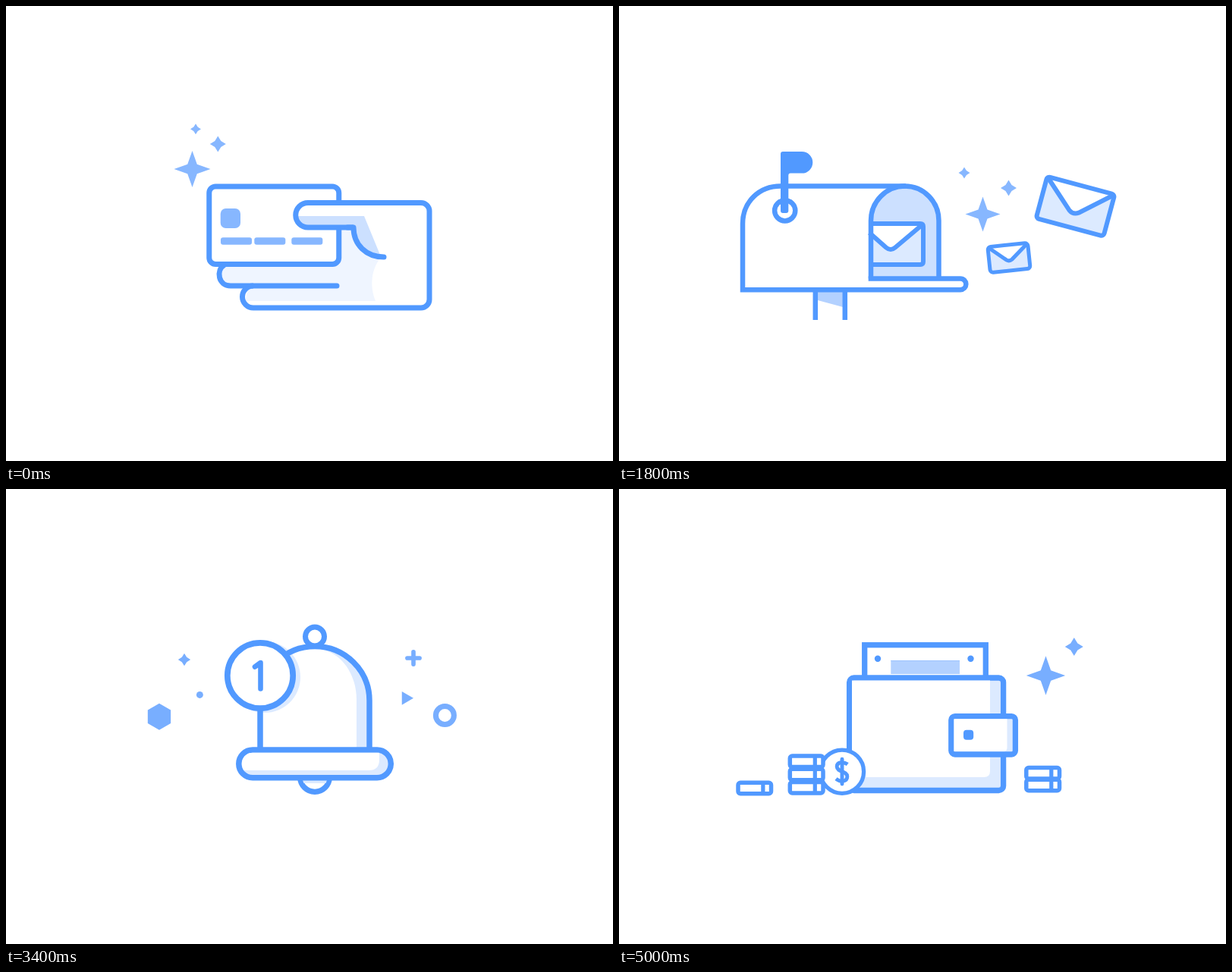
Write an HTML page that moves like this. It is 800 px wide and 600 px high and loops after 5.8 s.

```html
<!DOCTYPE html>
<html lang="en">
<head>
<meta charset="utf-8">
<title>Line icons</title>
<style>
html, body { margin: 0; width: 100%; height: 100%; overflow: hidden; background: #fff; }
svg { display: block; width: 800px; height: 600px; }
</style>
</head>
<body>
<svg id="stage" viewBox="0 0 800 600"></svg>
<script>
const BLUE = '#5199ff', MID = '#78aeff', SOFT = '#87b7ff', SHADE = '#b3d1ff',
      PALE = '#cce0ff', LIGHT = '#dceaff', FAINT = '#eff5ff', WHITE = '#fff';

const area = (d, color) => `<path d="${d}" fill="${color}"/>`;
const line = (d, w = 7, fill = 'none', color = BLUE, cap = 'butt') =>
  `<path d="${d}" fill="${fill}" stroke="${color}" stroke-width="${w}" stroke-linecap="${cap}"/>`;
const round = (d, w, color = BLUE) => line(d, w, 'none', color, 'round');
const rect = (x, y, w, h, r, fill, sw = 0) =>
  `<rect x="${x}" y="${y}" width="${w}" height="${h}" rx="${r}" fill="${fill}"` +
  (sw ? ` stroke="${BLUE}" stroke-width="${sw}"/>` : '/>');
const dot = (x, y, r, color = MID) => `<circle cx="${x}" cy="${y}" r="${r}" fill="${color}"/>`;
const ring = (x, y, r, w, fill = WHITE, color = BLUE) =>
  `<circle cx="${x}" cy="${y}" r="${r}" fill="${fill}" stroke="${color}" stroke-width="${w}"/>`;
const place = (x, y, s, body, turn = 0) =>
  `<g transform="translate(${x} ${y}) rotate(${turn}) scale(${s})">${body}</g>`;

function polygon(x, y, radii, n, color) {
  const points = Array.from({ length: n }, (_, i) => {
    const a = i * 2 * Math.PI / n - Math.PI / 2, r = radii[i % radii.length];
    return `${(x + r * Math.cos(a)).toFixed(1)},${(y + r * Math.sin(a)).toFixed(1)}`;
  });
  return `<polygon points="${points.join(' ')}" fill="${color}"/>`;
}
const star = (x, y, r, color = MID) =>
  polygon(x, y, [r, r * (r > 15 ? .37 : .54)], 8, color);
const plus = (x, y, r, w, color = MID) =>
  round(`M${x - r},${y}h${2 * r}M${x},${y - r}v${2 * r}`, w, color);

const confettiLeft = (x, y, s) => place(x, y, s,
  star(0, 0, 7.5) + dot(18.7, 42.6, 4.1) + polygon(-30.3, 69, [16], 6, MID));
const confettiRight = (x, y, s) => place(x, y, s,
  plus(0, 0, 7.4, 5.2) + area('M-14,40.3l14,8.2l-14,8.2z', MID) +
  ring(38, 69.3, 11, 6.5, WHITE, MID));

const dollar = (x, y, s) => place(x, y, s,
  round('M0,-35.2V34.8', 10.5) +
  line('M15.5,-20.5C5,-28 -14.5,-28 -14.5,-14C-14.5,1.5 14.5,-2 14.5,13.5C14.5,29 -5,30 -17,20', 10.5));

function coins(x, bottom, n, w = 43.5, h = 14.5, step = 15.7, sw = 5.5) {
  let out = '';
  for (let i = 0; i < n; i++) {
    const y = bottom - h - i * step;
    out += rect(x, y, w, h, 3, WHITE, sw) + line(`M${x + w * .755},${y}v${h}`, sw * .95);
  }
  return out;
}

const envelope = (x, y, turn, w, h, sw, dip) => {
  const a = w / 2, b = h / 2, flap = `M${-a + 1},${-b + 1}L${-a * .14},${dip}q${a * .14},${a * .1} ${a * .28},0L${a - 1},${-b + 1}`;
  return place(x, y, 1, rect(-a, -b, w, h, 4, LIGHT) + area(flap + 'z', WHITE) +
    line(flap, sw) + rect(-a, -b, w, h, 4, 'none', sw), turn);
};

const wave = (n, half, rise) =>
  `c${half / 2},0 ${half / 2},${-rise} ${half},${-rise}s${half / 2},${rise} ${half},${rise}`.repeat(n);

function cardInHand() {
  const thumb = 'M458,292H398a16.25,16.25 0 0 1 0,-32.5';
  return star(245.5, 215, 24, SOFT) + star(279.3, 182, 10.5, SOFT) + star(250, 162.3, 7, SOFT) +
    area('M290,341H440V292H458C459,316 476,331 494,332C480,348 480,372 487,389H316C316,378 320,372 326,369H296C277,369 276,345 290,341z', FAINT) +
    round('M288,341C276,349 280,369 296,369H436', 7) +
    rect(267.75, 238, 171, 102.5, 8.5, WHITE, 7) +
    rect(282.7, 267, 26.3, 26, 7, SOFT) +
    [283, 327.3, 376.3].map(x => rect(x, 305.2, 41, 9.6, 3, SOFT)).join('') +
    area(thumb + 'H472V277L458,292z', WHITE) +
    area('M384,277H472L493,328C474,325 462,310 459,292H398C390,292 384,284 384,277z', PALE) +
    line(thumb + 'H547a11,11 0 0 1 11,11V387a11,11 0 0 1 -11,11H326a14.5,14.5 0 0 1 0,-29') +
    `<g stroke-linejoin="round">${round('M450,292H458C458,315 475,331 498,331', 7)}</g>`;
}

function paintedScreen() {
  const paint = 'M456,209V274.5a15.5,15.5 0 0 1 -31,0V258a8.25,8.25 0 0 0 -16.5,0V317a15.5,15.5 0 0 1 -31,0';
  let teeth = '';
  for (let i = 0; i < 10; i++) teeth += `M${345 + 5.35 * i},${247 + 5.35 * i}l-12,12`;
  return confettiLeft(227.7, 254.5, 1) + confettiRight(573, 252.5, 1) +
    area('M375,379H442V395L375,387.5z', '#a8cbff') +
    line('M372,376V396C372,405 366,412 357,412V424.3H459.7V412C451,412 444.7,405 444.7,396V376') +
    rect(283, 184, 250.5, 192, 11, 'none', 7) +
    area(paint + 'L310,290V209z', PALE) + line(paint) +
    rect(310.5, 209, 195.5, 139.3, 0, 'none', 7) +
    line('M272,317C279,335 275,349 266,358L234.3,388a12.5,12.5 0 0 0 17.7,17.7L286,374C296,364 313,362 327,371z', 7, WHITE) +
    dot(244.8, 395.6, 5.6, BLUE) +
    line('M289,293L348,352L327.5,371.5L269.5,314z', 6.5, LIGHT) +
    line('M344,238.5L403,297L348,352L289,293z', 6.5, WHITE) +
    round(teeth, 4.6) + round('M285,303L302,320M308,325.5L311.5,329', 5);
}

function mailbox() {
  const arch = 'M332,359.5V283a44.75,45.5 0 0 1 89.5,0V359.5';
  const flap = 'M330,299L352,318.5q6,5 12,0L399,289';
  return star(479.5, 274.5, 23, SOFT) + star(513.5, 240, 10.5, SOFT) + star(455, 220, 7.5, SOFT) +
    envelope(601.5, 264.2, 15, 92, 57, 6, 7) + envelope(514, 332, -6, 53, 34, 5, 2.5) +
    area('M260,375H297V397.5L260,387.5z', SHADE) +
    line('M258.8,374V414M297.8,374V414', 6.5) +
    area(arch, PALE) +
    area('M332,287H401V341H332z', LIGHT) + area(flap + 'V287H330z', WHITE) + line(flap, 6) +
    line('M332,287H397q4,0 4,4V337q0,4 -4,4H332', 6) +
    line(arch, 6.5) +
    line('M378,237.5H213C185,237.5 163,258 163,287V374.2H450a7.35,7.35 0 0 0 0,-14.7H328.7', 6.5) +
    ring(218.7, 269.8, 13.6, 6.5) +
    area('M216,192H241a14.3,14.3 0 0 1 0,28.6H226q-2.7,0 -2.7,3V270q0,3 -3,3H216q-3,0 -3,-3V195q0,-3 3,-3z', BLUE);
}

function receipt() {
  return dot(210, 260.2, 4.7) + plus(229.5, 295.2, 9, 5.7) +
    line('M424,266H572') +
    line('M517,353.3H520.5C522,343 522.3,330 522.3,316a49.6,50.3 0 0 1 99.2,0V353.3z', 7, WHITE) +
    area('M525,350C526,335 526,325 526,316C526,289 545,270 568,269.5C590,271 605,291 605,315V350z', LIGHT) +
    line('M269.5,197.5V340C269.5,368 292,388.7 320,388.7H473C446,388.7 423.5,366 423.5,337V202', 7.5) +
    line('M473,388.7C488,388.7 500,382 509,372', 7.5) +
    round('M269.5,201.6' + wave(6, 12.8, 5), 7.3) +
    area('M262,190h4v16h-4z', WHITE) +
    dollar(346.5, 297.5, 1) +
    coins(204, 389, 2) + coins(507.3, 389, 2) + coins(566.5, 389, 1, 43, 14);
}

function bell() {
  const dome = 'M335,344V279a72,71.5 0 0 1 144,0V344';
  return confettiLeft(235, 225, 1.09) + confettiRight(537, 223, 1.09) +
    ring(407, 194.5, 12.5, 7) +
    area(dome, WHITE) + dot(341, 248, 47, LIGHT) +
    area('M407,210C440,212 462,242 462,278V342H478V279C478,240 445,210 407,210z', LIGHT) +
    line(dome, 7.5) +
    ring(407, 380, 19.3, 7.2) + area('M391,384H423L421.5,388H392.5z', LIGHT) +
    rect(306.8, 344, 200.5, 36.7, 18.3, LIGHT, 7.5) +
    area('M325,347.7H492V357q0,14 -14,14H313.5C307,361 313,347.7 325,347.7z', WHITE) +
    ring(335, 246, 43.2, 7.7) +
    `<g stroke-linejoin="round">${round('M335.5,263.5V229L328,234.5', 6.6)}</g>`;
}

function calculator() {
  const zero = x => `M${x + 2.6},278.3h7.8M${x + 2.6},288.7h7.8M${x + 1.3},279.6v7.8M${x + 11.7},279.6v7.8`;
  const keys = [[323, 312], [368, 312], [323, 359], [368, 359]];
  return star(563, 248, 21.3) + star(593.5, 216.8, 9.7) +
    area('M446,250V217C446,200 455,187 470,182C486,186 496,198 496,215V385C496,402 504,412 520,417H470V250z', LIGHT) +
    area('M519,360H562.5V380C562.5,399 553,411 541,415C527,408 519,398 519,382z', LIGHT) +
    line('M326.5,250V217C326.5,195 342,178.7 364,178.7H480') +
    line('M442.5,250V217C442.5,195 459,178.7 480,178.7C502,178.7 516.7,195 516.7,217V382C516.7,404 533,419 555,419C577,419 591.5,403 591.5,382V353.5M470,419H555', 7.3) +
    line('M518,361' + wave(5, 7.4, 3.3), 6.3) +
    round('M347.5,210.3H385.5M408.5,210.3H423M347.5,229.4H385.5M408.5,229.4H423', 8.6, MID) +
    rect(303.4, 250.2, 166.3, 170, 27, WHITE, 7.4) +
    rect(323, 269.3, 126, 28, 12, WHITE, 6.7) +
    line([385, 402, 419].map(zero).join(''), 2.6) +
    keys.map(([x, y]) => rect(x, y, 36, 36.3, 8, MID)).join('') +
    rect(413, 312, 36.2, 83.3, 8, MID) +
    plus(341, 330, 6.8, 4.3, WHITE) +
    round('M379.2,330h13.6M336.5,372.7l9,9m0,-9l-9,9M379.2,377.2h13.6M424.2,349h13.6M424.2,358.7h13.6', 4.3, WHITE) +
    dot(386, 370.2, 2.3, WHITE) + dot(386, 384.2, 2.3, WHITE) +
    ring(476, 399.8, 23.2, 5.3) + dollar(476, 399.8, .4) +
    coins(205, 419.3, 1, 36.5, 12, 13, 5) + coins(249.5, 419.3, 2, 36, 12, 13, 5);
}

function wallet() {
  return star(562.5, 246, 25.7) + star(599.8, 208, 12) +
    rect(323.7, 205.7, 159.6, 44, 0, WHITE, 7.3) +
    dot(341, 223.8, 4.2, BLUE) + dot(463.5, 223.8, 4.2, BLUE) +
    rect(358.3, 226, 90.7, 18, 0, SHADE) + rect(358.3, 226, 90.7, 1, 0, '#9cc4ff') +
    rect(303.6, 249, 203, 148.5, 6, LIGHT, 7.3) +
    area('M307,252.6H489V372q0,8 -8,8H307z', WHITE) +
    rect(437.8, 299.6, 84.6, 50.4, 5, LIGHT, 7.3) +
    area('M441.5,303.3H511.5V341q0,5 -5,5H441.5z', WHITE) +
    rect(454, 317.7, 13.2, 13, 4, BLUE) +
    ring(294, 372.7, 28.6, 5.3) + dollar(294, 372.7, .47) +
    coins(157, 401.7, 1) + coins(225.3, 401, 3, 43.7, 14.5, 17.2) + coins(536.8, 397.7, 2, 43.7);
}

const scenes = [cardInHand, paintedScreen, mailbox, receipt, bell, calculator, wallet].map(draw => draw());
const stage = document.getElementById('stage');
const FIRST = 1000, HOLD = 800, LOOP = FIRST + 6 * HOLD;
let shown = -1;

function tick() {
  const t = performance.now() % LOOP;
  const next = t < FIRST ? 0 : 1 + Math.floor((t - FIRST) / HOLD);
  if (next !== shown) stage.innerHTML = scenes[shown = next];
  requestAnimationFrame(tick);
}
tick();
</script>
</body>
</html>
```
